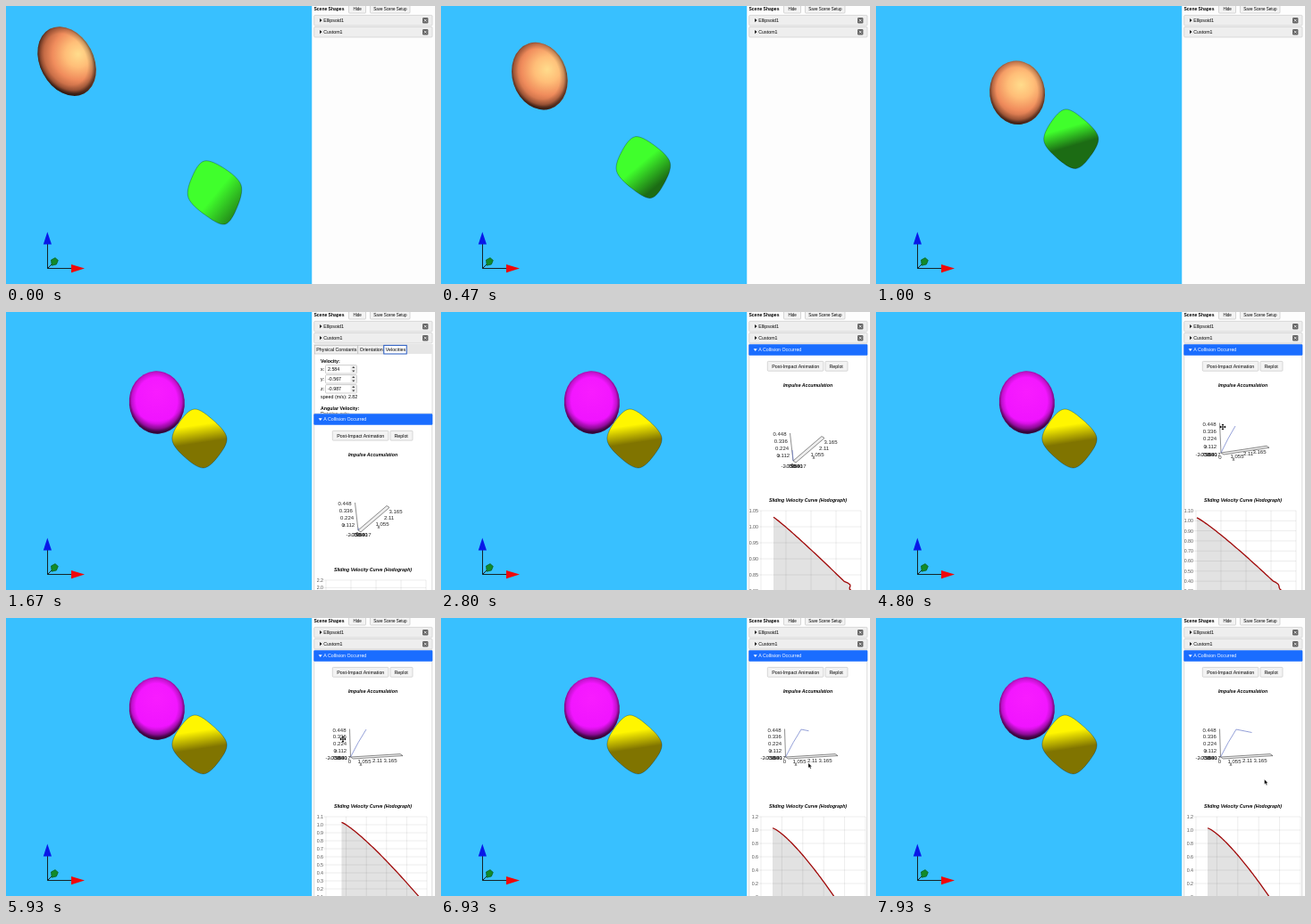
These frames come from a looping animation (480 by 312 pixels, 8000 ms). An HTML page:

```html
<!DOCTYPE html>
<html lang="en">
<head>
<meta charset="utf-8">
<title>Collision</title>
<style>
  html, body { margin: 0; width: 100%; height: 100%; overflow: hidden; background: #fff; }
  svg { display: block; width: 480px; height: 312px; font: 5.3px Arial, "Liberation Sans", sans-serif; }
  .b { font-weight: bold; }
  .title { font-weight: bold; font-style: italic; font-size: 5.2px; text-anchor: middle; }
  .btn { fill: #f3f3f3; stroke: #c8c8c8; stroke-width: .7; }
  .plot { font-size: 6px; text-anchor: middle; fill: #222; }
  .tick { text-anchor: end; fill: #555; }
</style>
</head>
<body>
<svg viewBox="0 0 480 312">
  <defs>
    <radialGradient id="orange" gradientUnits="userSpaceOnUse" r="48">
      <stop offset="0" stop-color="#ffdc8c"/><stop offset=".3" stop-color="#ffbe78"/>
      <stop offset=".6" stop-color="#f08c5c"/><stop offset=".85" stop-color="#b9623f"/>
      <stop offset="1" stop-color="#5c3020"/>
    </radialGradient>
    <radialGradient id="magenta" gradientUnits="userSpaceOnUse" cx="1" cy="-12" r="48">
      <stop offset="0" stop-color="#f81cff"/><stop offset=".68" stop-color="#f014ff"/>
      <stop offset=".84" stop-color="#b40ec0"/><stop offset="1" stop-color="#5c0664"/>
    </radialGradient>
    <radialGradient id="rim" cy=".47">
      <stop offset=".74" stop-opacity="0"/><stop offset=".9" stop-opacity=".2"/>
      <stop offset="1" stop-opacity=".55"/>
    </radialGradient>
    <linearGradient id="cubeLight" gradientUnits="userSpaceOnUse">
      <stop offset="0" id="lit"/><stop offset="1" id="dark"/>
    </linearGradient>
    <clipPath id="tabClip"><rect id="tabArea" x="343" y="36" width="137"/></clipPath>
  </defs>

  <rect width="342.5" height="312" fill="#38c0ff"/>
  <path d="M46.5 267V294.5H74M46.5 294.5L52 289" fill="none" stroke="#111" stroke-width=".9"/>
  <path d="M46.3 253.5L41.8 267.5H51Z" fill="#0818e8"/>
  <path d="M88 294.6L73 290V299.2Z" fill="#f00808"/>
  <path d="M50.5 285L55 282.6L58.3 285.4L56.4 290L51.2 291.2Z" fill="#128a2a" stroke="#0a5a1a" stroke-width=".7"/>

  <g id="ball"><ellipse id="skin"/><ellipse id="shade" fill="url(#rim)"/></g>
  <path id="cube" fill="url(#cubeLight)" stroke="#000" stroke-opacity=".35" stroke-width=".8"/>

  <rect x="342.5" width="137.5" height="312" fill="#fdfdfd"/>
  <text class="b" x="344.5" y="5.3" style="font-size:5px">Scene Shapes</text>
  <g id="rows"></g>

  <g id="tabs" clip-path="url(#tabClip)">
    <rect x="345" y="34" width="132" height="170" fill="#fff" stroke="#ccc" stroke-width=".7"/>
    <rect x="345" y="36" width="132" height="11" fill="#e6e6e6"/>
    <g id="tabBody"></g>
  </g>

  <g id="report">
    <rect x="344.8" y="36" width="132" height="290" fill="#fff" stroke="#ccc" stroke-width=".7"/>
    <rect x="344.3" y="36.3" width="133" height="12.4" rx="1.2" fill="#1a6dff"/>
    <path d="M349.7 41.2h4l-2 2.8z" fill="#fff"/>
    <text x="355.3" y="44.3" fill="#fff">A Collision Occurred</text>
    <rect class="btn" x="365.3" y="55.4" width="62.6" height="10.8" rx="1"/>
    <text x="370.3" y="62.7">Post-Impact Animation</text>
    <rect class="btn" x="430" y="55.4" width="25" height="10.8" rx="1"/>
    <text x="434.5" y="62.7">Replot</text>
    <text class="title" x="410.5" y="83.6">Impulse Accumulation</text>
    <g id="impulse"></g>
    <text class="title" x="410.5" y="213.2">Sliding Velocity Curve (Hodograph)</text>
    <g id="chart"></g>
  </g>
  <g id="cursor"></g>
</svg>

<script>
const LOOP = 8000, HIT = 1120, OPEN = 1450, CLOSED = 1890;
const $ = id => document.getElementById(id);
const set = (id, attrs) => { for (const k in attrs) $(id).setAttribute(k, attrs[k]); };
const clamp = v => Math.max(0, Math.min(1, v));
const mix = (a, b, p) => Array.isArray(a) ? a.map((v, i) => mix(v, b[i], p)) : a + (b - a) * p;
const add = (a, b, k = 1) => [a[0] + b[0] * k, a[1] + b[1] * k];
const swing = p => (1 - Math.cos(Math.PI * p)) / 2;
const poly = (pts, close = '') => 'M' + pts.map(p => p.map(v => v.toFixed(2)).join(' ')).join('L') + close;

// Value at time t from [time, value] keys
function at(keys, t) {
  const i = keys.findIndex(k => t < k[0]);
  if (i === 0) return keys[0][1];
  if (i < 0) return keys[keys.length - 1][1];
  const [t0, a] = keys[i - 1], [t1, b] = keys[i];
  return mix(a, b, (t - t0) / (t1 - t0));
}

// Closed Catmull-Rom curve
function smooth(pts) {
  const n = pts.length, get = i => pts[(i + n) % n];
  return 'M' + pts[0] + pts.map((b, i) => {
    const a = get(i - 1), c = get(i + 1), e = get(i + 2);
    return 'C' + [...add(b, add(c, a, -1), 1 / 6), ...add(c, add(e, b, -1), -1 / 6), ...c];
  }).join('') + 'Z';
}

// Rounded box: four corners with bulging edges
function bulge(corners) {
  return smooth(corners.flatMap((c, i) => {
    const [x, y] = add(c, corners[(i + 1) % 4]);
    return [c, [x * .61, y * .61]];
  }));
}

const button = (x, w, tx, label) =>
  `<rect class="btn" x="${x}" y="-2" width="${w}" height="10" rx="1"/>
   <text x="${tx}" y="5.3" style="font-size:4.5px">${label}</text>`;
const row = (y, label) =>
  `<rect x="344.7" y="${y}" width="132.3" height="11.6" rx="1.2" fill="#eee" stroke="#ccc" stroke-width=".7"/>
   <path d="M351 ${y + 3.6}v4.2l2.6-2.1z" fill="#222"/>
   <text x="355.3" y="${y + 7.6}">${label}</text>
   <rect x="466" y="${y + 2.6}" width="6.4" height="6.4" rx="1.2" fill="#666"/>
   <path d="M467.8 ${y + 4.4}l2.8 2.8m0-2.8l-2.8 2.8" stroke="#fff" stroke-width=".7"/>`;
$('rows').innerHTML = button(383.5, 19, 388.6, 'Hide') + button(407.5, 44.5, 411.3, 'Save Scene Setup') +
  row(10.4, 'Ellipsoid1') + row(23.4, 'Custom1');

const tab = (x, w, label, on) =>
  `<rect x="${x}" y="37.4" width="${w}" height="9.6" fill="${on ? '#fff' : '#f0f0f0'}"
     stroke="${on ? '#2458c0' : '#bbb'}" stroke-width="${on ? 1 : .6}"/>
   <text x="${x + 2}" y="44">${label}</text>`;
const field = (y, name, value) =>
  `<text x="352" y="${y + 1.8}">${name}</text>
   <rect x="357.5" y="${y - 4.6}" width="35" height="9.4" rx="1" fill="#fff" stroke="#bbb" stroke-width=".7"/>
   <text x="360" y="${y + 2}">${value}</text>
   <rect x="385.5" y="${y - 4.2}" width="6.6" height="8.6" fill="#eee"/>
   <path d="M387.2 ${y - 1.2}h3.2l-1.6-1.9zm0 2.6h3.2l-1.6 1.9z" fill="#444"/>`;
const fields = (y, values) => values.map((v, i) => field(y + 11 * i, 'xyz'[i] + ':', v)).join('');
$('tabBody').innerHTML = tab(345.3, 48, 'Physical Constants') + tab(393.8, 28.4, 'Orientation') +
  tab(422.8, 25.4, 'Velocities', true) +
  '<text class="b" x="352" y="56.6">Velocity:</text>' + fields(64.2, ['2.584', '-0.567', '-0.987']) +
  '<text x="352" y="97">speed (m/s): 2.82</text><text class="b" x="352" y="109.6">Angular Velocity:</text>' +
  '<text x="352" y="116.4">Rotation axis:</text>' + fields(124, ['0.000', '0.000', '1.000']);

// Cube corners and light direction, at the start and at impact
const corners = [
  [[-11, -36], [30, -9], [12, 35], [-29, 5]],
  [[-6, -33], [30, -1], [4, 33], [-31, 2]]
];
const light = [[2, 0, 34, 26], [-4, -15, -1, 5]];

function drawBodies(t) {
  const p = clamp(t / HIT), hit = t >= HIT;
  const [x, y, rx, ry, turn] = mix([68, 62, 30, 41, -28], [168.8, 101.5, 31, 35.2, -5], p);
  set('orange', { cx: mix(15, 4, p), cy: mix(-1, -9, p) });
  set('ball', { transform: `translate(${x} ${y}) rotate(${turn})` });
  set('skin', { rx, ry, fill: hit ? 'url(#magenta)' : 'url(#orange)' });
  set('shade', { rx, ry });
  const [cx, cy] = mix([233, 210], [217, 142], p);
  const [x1, y1, x2, y2] = mix(...light, p);
  set('cubeLight', { x1, y1, x2, y2 });
  set('lit', { 'stop-color': hit ? '#fff600' : '#40ff2c' });
  set('dark', { 'stop-color': hit ? '#807400' : '#1c6c14' });
  set('cube', { d: bulge(mix(...corners, p)), transform: `translate(${cx} ${cy})` });
}

// Projected plot axes for three camera angles
const views = [
  { z: [379, 137], dz: [1.3, 8], x: [421, 160], dx: [7.5, -7], low: [395, 172.5], base: [394, 167], far: [426, 139.5] },
  { z: [373, 125.5], dz: [.3, 8.35], x: [404, 162], dx: [12.5, -2.6], low: [372, 159.5], base: [386, 158], far: [437, 150.3] },
  { z: [373, 125.5], dz: [.3, 7.7], x: [401, 160.5], dx: [14.5, -.5], low: [372, 156.7], base: [385.5, 156], far: [441, 152.6] }
];
const camera = [[3200, 0], [4600, 1], [5000, 1], [5700, 2]];
const peak = [[1500, [395, 166]], [2800, [393, 155]], [4800, [402, 128]], [5930, [403, 125]]];

function drawImpulse(t) {
  const c = at(camera, t), i = Math.min(1, Math.floor(c)), v = {};
  for (const k in views[0]) v[k] = mix(views[i][k], views[i + 1][k], c - i);
  const { z, dz, x, dx, low, base, far } = v, thick = [3, 2];
  const tip = at(peak, t), knee = add(mix(base, tip, .5), [0, -1]);
  const end = add(tip, [17.5, 3.5], clamp((t - 6000) / 1930));
  const label = (s, [lx, ly]) => `<text x="${lx}" y="${ly + 2}">${s}</text>`;
  $('impulse').innerHTML =
    `<path d="${poly([base, far, add(far, thick), add(base, thick)], 'Z')}" fill="#eee" stroke="#444" stroke-width=".6"/>
     <path d="${poly([add(z, [11.5, -1]), base])}" stroke="#444" stroke-width=".6"/>
     <path d="${poly([base, knee, tip, end])}" fill="none" stroke="#6678c8" stroke-width=".7"/>
     <g class="plot">` +
    ['0.448', '0.336', '0.224', '0.112'].map((s, n) => label(s, add(z, dz, n))).join('') +
    ['1.055', '2.11', '3.165'].map((s, n) => label(s, add(x, dx, n))).join('') +
    ['-2.750', '-0.384', '0.500', '0.017'].map((s, n) => label(s, add(low, [4, 0], n - 1.5))).join('') +
    label('z', add(add(z, dz, 3), [-5, 0])) + label('x', add(x, [-4, 3])) +
    label('0', add(base, [-1, 4.5])) + '</g>';
}

// Axis scale and curve span in use from each time on
const scales = [
  { from: 0, top: 2.2, step: .2, gap: 8.5, digits: 1, col: 28, x0: 414, x1: 416, pow: 1, jag: 0 },
  { from: 2100, top: 1.05, step: .05, gap: 18, digits: 2, col: 28, x0: 372, x1: 464, pow: 1.07, jag: 3 },
  { from: 3700, top: 1.1, step: .1, gap: 11.3, digits: 2, col: 28, x0: 359, x1: 458, pow: 1.13, jag: 2 },
  { from: 5400, top: 1.1, step: .1, gap: 9, digits: 1, col: 22.6, x0: 375.5, x1: 464, pow: 1.2, jag: 0 },
  { from: 6900, top: 1.2, step: .2, gap: 15, digits: 1, col: 23.4, x0: 371, x1: 441.5, pow: 1.3, jag: 0 }
];
const LEFT = 358, TOP = 223, END = 315, FIRST = 1.03;

function drawChart(t) {
  const s = scales.filter(k => t >= k.from).pop();
  let grid = '', text = '';
  for (let i = 0; i * s.gap < 95; i++) {
    const y = TOP + i * s.gap, v = s.top - i * s.step;
    grid += `M${LEFT - 3} ${y}H${LEFT + 5 * s.col - (s.col > 25 ? s.col : 0)}`;
    text += `<text x="${LEFT - 3}" y="${y + 1.9}">${v < .001 ? 0 : v.toFixed(s.digits)}</text>`;
  }
  for (let x = LEFT; x < 476; x += s.col) grid += `M${x} ${TOP}V320`;
  const y0 = TOP + (s.top - FIRST) / s.step * s.gap, pts = [];
  for (let u = 0; u < 1.01; u += .02) {
    const kink = u > .86 ? s.jag * Math.sin((u - .86) * 45) : 0;
    pts.push([mix(s.x0, s.x1, u) + kink, mix(y0, END, u ** s.pow)]);
  }
  $('chart').innerHTML =
    `<path d="${poly([...pts, [s.x1, 330], [s.x0, 330]], 'Z')}" fill="#e2e2e2"/>
     <path d="${grid}" stroke="#000" stroke-opacity=".13" stroke-width=".6"/>
     <path d="${poly(pts)}" fill="none" stroke="#a00808" stroke-width="1.3" stroke-linejoin="round"/>
     <g class="tick">${text}</g>`;
}

const pointer = [[3000, [416, 161]], [4600, [388, 129]], [5000, [388, 129]], [5800, [377, 136]],
  [6400, [377, 136]], [7300, [434.5, 181]]];
const crossIcon = '<path d="M-3 0H3M0-3V3" stroke="#222"/><path d="M-3.6 0l1.6-1.4v2.8zM3.6 0L2-1.4v2.8zM0-3.6l1.4 1.6h-2.8zM0 3.6L1.4 2h-2.8z"/>';
const arrowIcon = '<path d="M0 0V5.8L1.3 4.6L2.3 6.8L3.3 6.3L2.4 4.2H4.1Z" stroke="#fff" stroke-width=".4"/>';
const show = (id, on) => set(id, { visibility: on ? 'visible' : 'hidden' });

function draw(t) {
  drawBodies(t);
  const open = t >= OPEN;
  const h = open ? 157 * (1 - swing(clamp((t - OPEN) / (CLOSED - OPEN)))) : 0;
  set('tabArea', { height: h });
  show('tabs', h > 0);
  show('report', open);
  set('report', { transform: `translate(0 ${h})` });
  if (open) { drawImpulse(t); drawChart(t); }
  show('cursor', t >= 3000);
  set('cursor', { transform: `translate(${at(pointer, t)})` });
  $('cursor').innerHTML = t < 6400 ? crossIcon : arrowIcon;
}

const start = performance.now();
function tick() {
  draw((performance.now() - start) % LOOP);
  requestAnimationFrame(tick);
}
tick();
</script>
</body>
</html>
```
